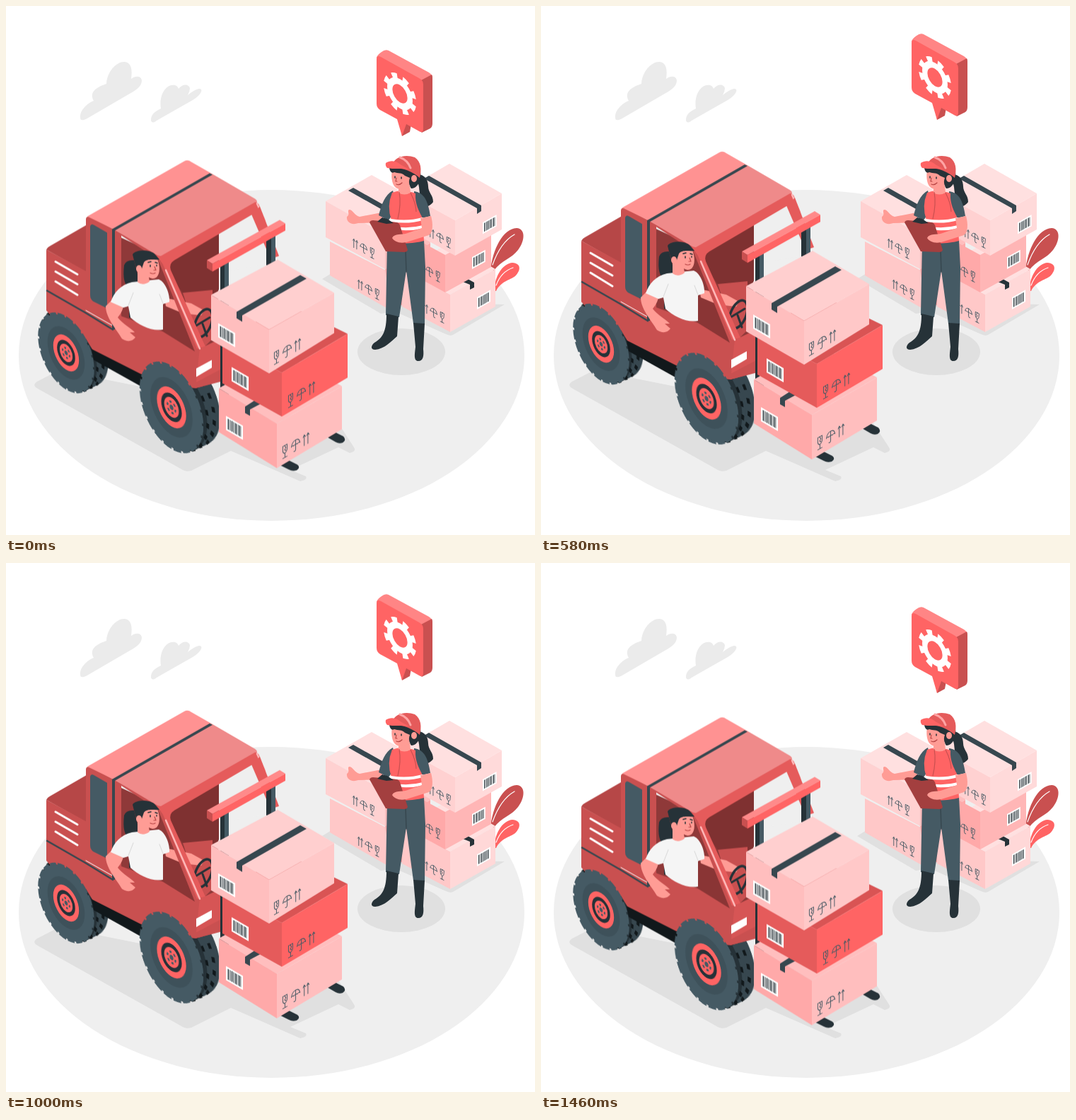
Write an HTML page that moves like this. It is 748 px wide and 748 px high and loops after 1500 ms.

```html
<!DOCTYPE html>
<html lang="en">
<head>
<meta charset="utf-8">
<title>Warehouse loading</title>
<style>
  html, body { margin: 0; width: 100%; height: 100%; overflow: hidden; background: #fff; }
  svg { display: block; width: 100vw; height: 100vh; }
  .bob { animation: bob 1.5s -5ms steps(18, jump-none) infinite; }
  .truck { --low: .5px; --high: -14.5px; }
  .bubble { --low: 1px; --high: -27px; }
  @keyframes bob {
    0%, 100% { transform: translateY(var(--low)); }
    50% { transform: translateY(var(--high)); }
  }
  .line { fill: none; stroke-linecap: round; stroke-linejoin: round; }
  .side { fill: #c95050; }
  .red { fill: #ff6464; }
  .mid { fill: #e55b5b; }
  .dark { fill: #263238; }
  .slate { fill: #455a64; }
  .skin { fill: #ff9c95; }
  .shade { fill: #e0e0e0; }
  .p0 { fill: #ffe0e0; }
  .p1 { fill: #ffd1d1; }
  .p2 { fill: #ffc8c8; }
  .p3 { fill: #ffbebe; }
  .p4 { fill: #ffa9a9; }
</style>
</head>
<body>
<svg viewBox="0 0 748 748">
  <defs>
    <g id="marks" class="line" stroke="#455a64" stroke-width="1.1">
      <path d="M-3-9H4V-3Q4 1 .5 2Q-3 1-3-3ZM.5 2V8M-3 8H4M0-9L2-5 0-3 2-1"/>
      <path d="M11-1Q12-8 18-8T25-1Q23-3 21-1 18-3 15-1 13-3 11-1M18-8V5Q18 8 15 7"/>
      <path d="M32 7V-8M30-5L32-8 34-5M38 7V-8M36-5L38-8 40-5"/>
    </g>
    <g id="code">
      <path fill="#fff" d="M0 0H28V20H0Z"/>
      <path d="M3 10H25" stroke="#263238" stroke-width="15" stroke-dasharray="1.5 .9 .8 1.2 .8 1"/>
    </g>
    <g id="tread">
      <circle r="59" cx="31" cy="-26" fill="#37474f"/>
      <circle r="59" cx="23" cy="-19" fill="#37474f"/>
      <circle r="57" cx="22" cy="-18" fill="none" stroke="#11181b" stroke-width="6" pathLength="20" stroke-dasharray=".4 .6"/>
      <circle r="59" cx="14" cy="-12" fill="#37474f"/>
      <circle r="59" cx="7" cy="-6" fill="#263238"/>
      <circle r="58" cx="9" cy="-8" fill="none" stroke="#11181b" stroke-width="5" pathLength="20" stroke-dasharray=".4 .6"/>
    </g>
    <g id="wheel">
      <circle r="56.5" class="slate"/>
      <circle r="57" fill="none" stroke="#455a64" stroke-width="4" pathLength="20" stroke-dasharray=".8 .2"/>
      <circle r="39" fill="#3e515a"/>
      <circle r="27" class="red"/>
      <circle r="19" class="dark"/>
      <circle r="13.5" class="red"/>
      <circle r="3.500" class="slate"/>
      <circle r="7.500" fill="none" stroke="#455a64" stroke-width="3" pathLength="12" stroke-dasharray="1 1"/>
    </g>
  </defs>

  <ellipse cx="375.5" cy="494" rx="357.5" ry="234" fill="#efefef"/>
  <g fill="#ebebeb">
    <path d="M105 158C104 148 114 138 124 134C118 124 124 116 142 110C143 92 157 78 168 79C177 80 179 90 177 103C184 98 191 99 192 105C192 113 186 117 180 121L113 160C108 162 105 162 105 158Z"/>
    <path d="M205 161C205 153 211 149 219 145C216 126 226 112 235 112C240 111 243 114 244 117C250 110 258 110 260 116Q260 121 257 126C266 119 273 115 276 118C278 122 271 129 264 133L213 162C208 166 205 165 205 161Z"/>
  </g>
  <g class="shade">
    <path d="M43 540Q37 536 44 531L75 515 300 560 470 590 492 624Q496 630 486 632L470 624 402 656 424 665Q427 670 416 672L318 629 262 657Q256 659 250 656Z"/>
    <path d="M447 386L470 372 620 420 705 422 632 465Q628 467 622 464L550 432 530 435Z"/>
    <ellipse cx="559" cy="489" rx="62" ry="33"/>
  </g>

  <!-- plant -->
  <path class="side" d="M685 374C688 345 702 315 722 314C735 315 734 332 724 345C715 357 700 360 690 374Z"/>
  <path class="red" d="M690 403C692 378 704 364 716 363C729 364 728 374 720 382C712 388 700 389 693 403Z"/>
  <path class="line" stroke="#fff" stroke-width="1.2" d="M688 366C695 346 705 331 719 323M693 395C697 384 705 374 717 370"/>

  <!-- rear stacks -->
  <g>
    <path class="p2" d="M458 333L545 378V431L458 381Z"/>
    <path class="p4" d="M536 372L600 335V400L545 431Z"/>
    <path class="p0" d="M452 276L517 239 600 285 536 323Z"/>
    <path class="p1" d="M452 276L536 323V372L452 327Z"/>
    <path class="p3" d="M536 323L600 285V335L536 372Z"/>
    <path fill="#37474f" d="M484 261L491 257 546 288 539 292Z"/>
    <use href="#marks" transform="matrix(-.69 -.37 0 .8 518 350)"/>
    <use href="#marks" transform="matrix(-.69 -.37 0 .8 525 408)"/>

    <path class="p2" d="M560 372L628 408V461L560 425Z"/>
    <path class="p0" d="M560 372L628 335 692 372 628 408Z"/>
    <path fill="#ffd8d8" d="M628 408L692 372V425L628 461Z"/>
    <path class="dark" d="M646 390L653 386 662 391V398L656 401V394Z"/>
    <path class="p4" d="M566 322L621 352V405L566 375Z"/>
    <path fill="#ffb6b6" d="M621 352L686 317V369L621 405Z"/>
    <path class="p0" d="M560 262L627 223 701 265 635 303Z"/>
    <path class="p1" d="M560 262L635 303V353L560 312Z"/>
    <path fill="#ffdada" d="M635 303L701 265V316L635 353Z"/>
    <path fill="#37474f" d="M591 244L598 240 672 282V290L666 294V286Z"/>
    <use href="#code" transform="matrix(.7 -.39 0 .82 674 306)"/>
    <use href="#code" transform="matrix(.67 -.37 0 .85 659 355)"/>
    <use href="#code" transform="matrix(.68 -.38 0 .85 666 412)"/>
    <use href="#marks" transform="matrix(-.69 -.37 0 .8 626 335)"/>
    <use href="#marks" transform="matrix(-.69 -.37 0 .8 611 383)"/>
    <use href="#marks" transform="matrix(-.69 -.37 0 .8 617 441)"/>
  </g>

  <!-- worker -->
  <g>
    <path class="dark" d="M580 238C592 237 597 246 597 255C597 264 604 267 604 277C601 282 595 283 594 285C586 277 585 266 584 256Z"/>
    <path class="slate" d="M539 333L591 331 593 370 592 450 576 449 566 374 556 440 537 437Z"/>
    <path class="dark" d="M538 435L555 439 553 467C545 474 535 485 522 486C515 486 516 480 521 476C533 469 538 460 538 435ZM576 448L592 449 590 485C591 495 590 502 583 502C576 502 578 492 579 482Z"/>
    <path class="line" stroke="#37474f" stroke-width="1.5" d="M565 345L566 376"/>
    <path class="skin" d="M531 292L500 298C492 296 491 288 485 288C482 290 487 295 482 298C481 307 490 310 498 307L533 306Z"/>
    <path class="slate" d="M547 261C536 267 531 280 527 296L541 303 553 285ZM577 262C592 264 597 277 600 297L585 301 576 285Z"/>
    <path class="red" d="M546 264C555 260 570 261 579 265C578 280 584 290 589 300L591 332C578 336 556 337 540 333L545 303Q538 283 546 264Z"/>
    <path class="skin" d="M555 256L571 254 572 264Q563 269 555 264Z"/>
    <path class="line" stroke="#fff" stroke-width="4" stroke-linecap="butt" d="M544 303Q568 307 589 301M544 313Q568 318 590 312"/>
    <path fill="none" stroke="#c95050" stroke-width="1.2" d="M556 263Q559 280 554 301M572 264Q580 280 580 291"/>
    <path fill="#a33f3f" d="M514 306Q515 303 519 303L553 306Q556 307 557 310L568 345Q567 348 563 348L537 347Z"/>
    <path class="dark" d="M525 305L532 299 539 301 548 307 538 308Z"/>
    <path class="skin" d="M586 300L601 297C604 308 604 320 598 324L566 334C556 336 549 333 546 328C549 321 560 324 568 321L588 314Z"/>
    <path class="skin" d="M546 231C544 244 546 257 556 259C566 260 575 252 579 240L570 227Z"/>
    <path class="dark" d="M542 229C543 235 546 237 549 235C554 237 560 235 564 240L571 243Q568 251 573 258C582 258 588 246 586 235L570 223Z"/>
    <ellipse class="skin" cx="577" cy="244" rx="4" ry="5"/>
    <path class="mid" d="M546 226C548 213 565 209 578 214C587 220 588 231 585 243C576 235 561 228 546 228Z"/>
    <path class="red" d="M537 222C544 217 553 219 559 225L570 231C558 229 548 231 539 229Q536 226 537 222Z"/>
    <path class="line" stroke="#ffa4a4" stroke-width="3" d="M557 214Q568 218 572 229"/>
    <path class="line" stroke="#263238" stroke-width="1.5" d="M550 241V243M559 242V244"/>
    <path class="line" stroke="#b84545" stroke-width="1.2" d="M552 243L551 248 553 248M552 252Q556 254 560 250"/>
  </g>

  <!-- speech bubble -->
  <g class="bob bubble">
    <path fill="#ff8585" d="M524 72Q525 68 531 64Q536 60 541 62L598 93Q603 96 603 101L590 112 530 78Z"/>
    <path class="side" d="M587 104L602 96Q603 97 603 101V165Q603 170 600 172L588 178 584 174ZM558 165L573 166 571 177 560 183Z"/>
    <path class="red" d="M524 74Q524 68 530 71L584 101Q590 104 590 110V172Q590 180 584 176L566 166 560 183 553 159 529 146Q524 143 524 137Z"/>
    <g transform="matrix(.866 .5 0 1 557 123)" fill="none" stroke="#fff">
      <circle r="16.500" stroke-width="8.500"/>
      <circle r="23" stroke-width="7.500" pathLength="16" stroke-dasharray="1 1" stroke-dashoffset="-.5"/>
    </g>
  </g>

  <!-- truck and load -->
  <g class="bob truck">
    <use href="#tread" transform="matrix(.674 .405 0 .88 84 490)"/>
    <use href="#tread" transform="matrix(.766 .46 0 1 234 567)"/>
    <path fill="#11181b" d="M118 470L200 502 192 538 124 500Z"/>

    <path fill="#b64747" d="M57 344Q58 341 62 339L114 309V376Z"/>
    <path class="side" d="M57 344L114 375V470L92 470 57 430Z"/>
    <path class="line" stroke="#fff" stroke-width="3" d="M70 361L101 379M70 375L101 393M70 389L101 408"/>

    <!-- cab interior -->
    <path fill="#8f3939" d="M152 322L219 353 300 322 300 480 270 490 152 445Z"/>
    <path fill="#7f3131" d="M222 366L301 320V400L290 428 255 412Z"/>
    <path fill="#efefef" d="M301 321L351 292 374 345 365 366 318 373 301 374Z"/>
    <path class="side" d="M250 405L292 401V470L276 486Z"/>
    <path fill="#8a3535" d="M215 415L252 430 266 488 222 462Z"/>
    <path class="skin" d="M224 412L262 420 280 430 276 437 250 434 226 424Z"/>
    <g class="line" stroke="#263238" stroke-width="3.5">
      <ellipse cx="279" cy="448" rx="11" ry="21" transform="rotate(22 279 448)"/>
      <path stroke-width="3" d="M268 452L288 440M278 449L284 466"/>
    </g>

    <!-- cab shell -->
    <path class="side" fill-rule="evenodd" d="M113 301Q113 297 118 297L152 315 219 352 277 488 290 495 268 540 225 536 189 519 122 485 113 470ZM163 324V438L222 460 267 488 215 358Z"/>
    <path class="slate" d="M119 311Q120 307 124 309L143 320V427L123 417Q119 414 119 408Z"/>
    <path class="line" stroke="#37474f" stroke-width="2.5" d="M58 402L112 433 151 457"/>
    <path class="line" stroke="#fff" d="M113 430L150 451"/>
    <path fill="#ff9292" d="M115 297L252 219Q257 216 262 220L290 236 152 315Z"/>
    <path fill="#ef8a8a" d="M152 315L290 236 352 272Q358 276 352 280L219 355Z"/>
    <path class="mid" d="M213 352L219 353 352 277Q358 276 360 288L347 295 238 359Q230 364 233 373L282 481 270 484 222 365Z"/>
    <path fill="#d65555" d="M274 484L299 472 306 478V529L268 540 273 492Z"/>
    <path class="line" stroke="#ffb9b9" stroke-width="2.5" d="M226 373L274 484M355 279L366 303"/>
    <path class="mid" d="M347 294L359 283 386 353 374 357Z"/>
    <path fill="#37474f" d="M150 315L288 236 292 238 154 317V457H150Z"/>
    <path fill="#fff" d="M269 512L291 500V511L269 524Z"/>
    <path class="side" d="M268 532L306 512V530L268 540Z"/>

    <!-- driver -->
    <path class="dark" d="M167 366Q170 358 181 359L189 390 185 442 174 440V398Q164 392 167 366Z"/>
    <path class="skin" d="M149 416L166 424C164 433 160 437 158 440C166 450 176 454 182 461L175 461 183 468C178 475 170 474 164 470C155 455 141 440 141 424Z"/>
    <path fill="#f5f5f5" d="M178 390L216 386C226 390 232 408 231 418L222 421V457C206 460 188 451 176 440L173 424 166 426 148 418C153 404 162 394 178 390Z"/>
    <path class="line" stroke="#d8d8d8" d="M173 423L180 405M222 420L217 407"/>
    <path class="skin" d="M186 364C188 350 205 349 214 357C218 367 218 378 213 383C209 386 205 385 202 383L203 389Q194 396 186 390Z"/>
    <path class="dark" d="M179 351C182 344 204 343 211 351L217 358C209 359 200 356 195 362L192 371 187 375C182 366 181 358 179 351Z"/>
    <ellipse class="skin" cx="188" cy="371" rx="4" ry="5"/>
    <path class="line" stroke="#263238" stroke-width="1.6" d="M204 366V368M213 366V367M201 362L205 361M211 362L214 363"/>
    <path class="line" stroke="#b84545" stroke-width="1.2" d="M210 368L212 373 209 373M204 377Q208 379 211 377"/>

    <use href="#wheel" transform="matrix(.674 .405 0 .88 85 490)"/>
    <use href="#wheel" transform="matrix(.766 .46 0 1 234 567)"/>

    <!-- mast -->
    <path class="dark" d="M303 365L315 359V560H303ZM368 325L381 318V366H368Z"/>
    <path class="slate" d="M309 362L315 359V560H309ZM375 322L381 318V366H375Z"/>
    <path fill="#ff8a8a" d="M284 359L387 302 395 307 292 364Z"/>
    <path class="red" d="M292 364L395 307V317L292 375Z"/>
    <path class="side" d="M284 359L292 364V375L284 370Z"/>

    <path class="dark" d="M388 649L400 642 412 648Q417 652 411 656 405 658 400 655ZM454 609L465 602 477 608Q482 613 476 617 471 619 466 616Z"/>

    <!-- cartons -->
    <path class="p3" d="M301 540L390 490 475 537 383 590Z"/>
    <path class="p4" d="M301 540L383 590V653L301 602Z"/>
    <path class="p3" d="M383 590L475 537V598L383 653Z"/>
    <path fill="#37474f" d="M338 566L352 557 360 562 345 570V579L338 575Z"/>
    <path fill="#d95454" d="M306 474L395 420 483 463 390 518Z"/>
    <path class="mid" d="M306 474L390 518V580L306 533Z"/>
    <path class="red" d="M390 518L483 463V525L390 580Z"/>
    <path fill="#ffcfcf" d="M290 408L384 358 464 405 372 457Z"/>
    <path class="p3" d="M290 408L372 457V519L290 472Z"/>
    <path class="p2" d="M372 457L464 405V462L372 519Z"/>
    <path fill="#37474f" d="M326 432L416 380 425 385 334 437V446L326 441Z"/>
    <use href="#code" transform="matrix(.86 .5 0 1 300 448)"/>
    <use href="#code" transform="matrix(.86 .5 0 1 319 510)"/>
    <use href="#code" transform="matrix(.86 .5 0 1 311 579)"/>
    <use href="#marks" transform="matrix(.866 -.5 0 1 382 497)"/>
    <use href="#marks" transform="matrix(.866 -.5 0 1 402 558)"/>
    <use href="#marks" transform="matrix(.866 -.5 0 1 394 630)"/>
  </g>
</svg>
</body>
</html>
```
